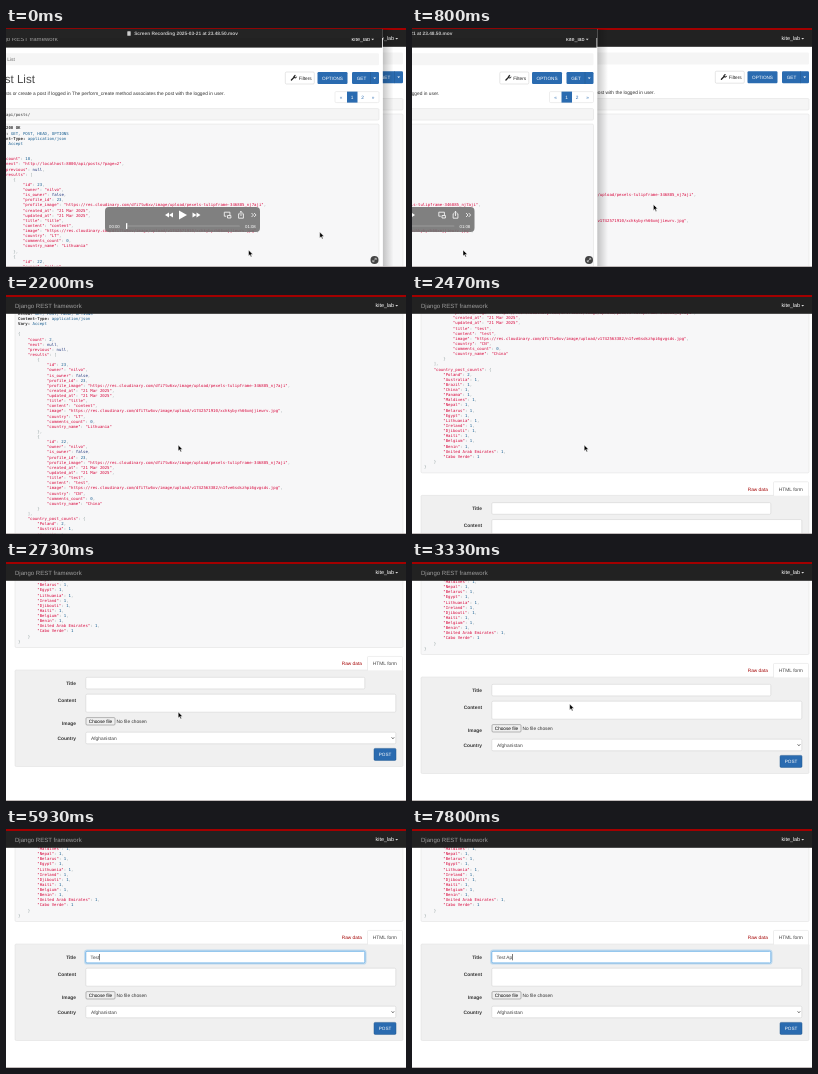
These frames come from a looping animation (400x239 px, 8000 ms). An HTML page:

```html
<!DOCTYPE html>
<html lang="en">
<head>
<meta charset="utf-8">
<title>Post List</title>
<style>
html, body { margin: 0; height: 100%; overflow: hidden; background: #fff; }
svg { display: block; width: 100vw; height: 100vh; }
text { font-family: "Liberation Sans", Arial, sans-serif; white-space: pre; text-rendering: geometricPrecision; }
.code { font-family: "DejaVu Sans Mono", monospace; }
.b { font-weight: bold; }
.mid { text-anchor: middle; }
.end { text-anchor: end; }
.str { fill: #d8063c; }
.num { fill: #195f91; }
.kwd { fill: #1e347b; }
.pun { fill: #93a1a1; }
</style>
</head>
<body>
<svg id="stage" viewBox="0 0 400 239" preserveAspectRatio="none"></svg>
<script>
const BLUE = '#2a6bb0', LINE = 5.13, SIZE = 4.75;
const USER = 'kite_lab', OWNER = 'nilvo';
const CDN = 'https://res.cloudinary.com/dfi7tw6xv/image/upload/';

const text = (x, y, s, size = SIZE, fill = '#333', cls = '') =>
  `<text x="${x}" y="${y}" font-size="${size}" fill="${fill}" class="${cls}">${s}</text>`;
const rect = (x, y, w, h, fill, stroke = 'none', r = 1.2) =>
  `<rect x="${x}" y="${y}" width="${w}" height="${h}" rx="${r}" fill="${fill}" stroke="${stroke}" stroke-width=".5"/>`;
const path = (d, fill, more = '') => `<path d="${d}" fill="${fill}" ${more}/>`;
const group = (id, body) => `<g id="${id}">${body}</g>`;
const caretDown = (x, y, fill) => path(`M${x} ${y}h2.8l-1.4 1.5z`, fill);

// ---- JSON listing: each line is [indent, string] ----
const colour = s => s.replace(/"[^"]*"|null|false|\d+|[^\s\w"]+/g, t => {
  const kind = t[0] === '"' ? 'str' : /\d/.test(t) ? 'num' : /[a-z]/.test(t) ? 'kwd' : 'pun';
  return `<tspan class="${kind}">${t}</tspan>`;
});

const post = (id, word, body, image, code, country, tail) => [
  [2, '{'],
  ...[
    `"id": ${id}`, `"owner": "${OWNER}"`, '"is_owner": false', '"profile_id": 23',
    `"profile_image": "${CDN}pexels-tulipframe-346885_nj7aji"`,
    '"created_at": "21 Mar 2025"', '"updated_at": "21 Mar 2025"',
    `"title": "${word}"`, `"content": "${body}"`, `"image": "${CDN}${image}"`,
    `"country": "${code}"`, '"comments_count": 0', `"country_name": "${country}"`
  ].map((s, i) => [3, s + (i < 12 ? ',' : '')]),
  [2, '}' + tail]
];

const countries = ['Poland', 'Australia', 'Brazil', 'China', 'Panama', 'Maldives', 'Nepal', 'Belarus',
  'Egypt', 'Lithuania', 'Ireland', 'Djibouti', 'Haiti', 'Belgium', 'Benin', 'United Arab Emirates', 'Cabo Verde'];

const listing = (count, next) => [
  [0, '{'], [1, `"count": ${count},`], [1, `"next": ${next},`], [1, '"previous": null,'], [1, '"results": ['],
  ...post(23, 'title', 'content', 'v1742571910/xchkybyrh66xmjjiewrv.jpg', 'LT', 'Lithuania', ','),
  ...post(22, 'test', 'test', 'v1742563382/n1fve6sdszhpi6gvgsds.jpg', 'CN', 'China', ''),
  [1, '],'], [1, '"country_post_counts": {'],
  ...countries.map((c, i) => [2, `"${c}": ${i ? 1 : 2}${i < countries.length - 1 ? ',' : ''}`]),
  [1, '}'], [0, '}']
];

const response = (count, next) => {
  const row = (i, x, s) => text(x, 91.4 + i * LINE, s, 4, '#333', 'code');
  const head = [['Allow', 'GET, POST, HEAD, OPTIONS'], ['Content-Type', 'application/json'], ['Vary', 'Accept']];
  return rect(9, 86, 388, 318, '#f7f7f8', '#ddd') +
    row(0, 12, '<tspan class="b">HTTP 200 OK</tspan>') +
    head.map(([k, v], i) =>
      row(i + 1, 12, `<tspan class="b">${k}:</tspan> <tspan class="num">${v}</tspan>`)).join('') +
    listing(count, next).map(([n, s], i) => row(i + 5, 12 + n * 9.63, colour(s))).join('');
};

// ---- page parts ----
const navbar = rect(0, 0, 400, 18.8, '#222', 'none', 0) + rect(0, 0, 400, 2, '#a30000', 'none', 0) +
  text(9, 12.7, 'Django REST framework', 6.06, '#9d9d9d') +
  text(369.5, 12.4, USER, 5.4, '#fff') + caretDown(389.3, 10, '#ddd');

const intro = rect(9, 24.5, 388, 12, '#f5f5f5') + text(14, 32.2, 'Post List', 4.9, '#666') +
  text(8.5, 54, 'Post List', 11.6, '#4a4a4a') +
  rect(303.3, 43.2, 29, 12, '#fff', '#ccc') + text(316.7, 50.8, 'Filters', SIZE, '#222') +
  path('M309.4 51.2l3.2-3.2', 'none', 'stroke="#222" stroke-width="1.3" stroke-linecap="round"') +
  path('M313.6 46.6a1.3 1.3 0 1 0 .9 1.3', 'none', 'stroke="#222" stroke-width="1"') +
  rect(335.5, 43.2, 30, 12, BLUE) + text(350.5, 50.8, 'OPTIONS', 4.67, '#fff', 'mid') +
  rect(370, 43.2, 27, 12, BLUE) + text(374.7, 50.8, 'GET', 4.67, '#fff') +
  path('M388.5 43.2v12', 'none', 'stroke="#22588f" stroke-width=".5"') + caretDown(391.3, 48.6, '#fff') +
  text(9, 66.2, 'List posts or create a post if logged in The perform_create method associates the post with the logged in user.', 4.82);

const pager = rect(353, 62.8, 44, 11, '#fff', '#ddd') + rect(365, 62.8, 10.5, 11, BLUE, 'none', 0) +
  [['«', 359, BLUE], ['1', 370.2, '#fff'], ['2', 380.5, BLUE], ['»', 391, BLUE]]
    .map(([s, x, c]) => text(x, 70, s, SIZE, c, 'mid')).join('');

const page = (url, count, next, paged) => intro + (paged ? pager : '') +
  `<g transform="translate(0 ${paged ? 9.3 : 0})">` +
  rect(9, 70.5, 388, 11.5, '#f5f5f5', '#ddd') +
  text(12, 77.7, `<tspan class="b">GET</tspan> ${url}`, 4, '#333', 'code') +
  response(count, next) + '</g>';

const label = (y, s) => text(70, y, s, 4.85, '#333', 'b end');
const form = '<g transform="translate(0 311.5)">' +
  rect(9, 115, 388, 96.5, '#f0f0f0', '#ddd') +
  path('M361.5 115.4v-13q0-1 1-1h33q1 0 1 1v13', '#fff', 'stroke="#ddd" stroke-width=".5"') +
  text(335.8, 110.3, 'Raw data', SIZE, '#a30000') + text(366.8, 110.3, 'HTML form', 4.85, '#444') +
  label(129.9, 'Title') + label(146.8, 'Content') + label(170, 'Image') + label(184.7, 'Country') +
  rect(79.8, 122.3, 279, 11.6, '#fff', '#ccc') +
  rect(79.8, 139.2, 310, 18, '#fff', '#ccc') +
  rect(80, 162.6, 29, 7.4, '#efefef', '#767676', 1) + text(94.5, 168, 'Choose file', 4.7, '#000', 'mid') +
  text(110.6, 168, 'No file chosen', 4.75) +
  rect(79.8, 177.2, 310, 11.6, '#fff', '#ccc') + text(85, 184.8, 'Afghanistan', 4.85, '#444') +
  path('M385.6 182.3l1.3 1.5 1.3-1.5', 'none', 'stroke="#333" stroke-width=".7"') +
  rect(368, 193.4, 22, 12, BLUE, '#22588f') + text(379, 201.1, 'POST', 4.67, '#fff', 'mid') + '</g>';

const field = group('focus',
    '<rect x="79.3" y="121.8" width="280" height="12.6" rx="2" fill="none" stroke="#66afe9" stroke-opacity=".35" stroke-width="2.4"/>' +
    '<rect x="79.8" y="122.3" width="279" height="11.6" rx="1.2" fill="#fff" stroke="#66afe9" stroke-width=".8"/>') +
  '<text id="typed" x="84.5" y="129.9" font-size="4.75" fill="#444"></text>' +
  group('caret', rect(0, 125, .6, 6.3, '#222', 'none', 0));

const arrow = path('M0 0v6l1.4-1.2 1 2.2 1-.5-1-2.1 1.9-.1z', '#000', 'stroke="#fff" stroke-width=".5"');
const ibeam = path('M-1.2-3.6Q0-3.6 0-3v6q0 .6-1.2.6M1.2-3.6Q0-3.6 0-3M0 3q0 .6 1.2.6', 'none', 'stroke="#222" stroke-width=".7"');

// ---- player window lying over the page ----
const icon = (x, d, more = '') => `<g transform="translate(${x} 187)">${path(d, '#fff', more)}</g>`;
const thin = 'fill-opacity="0" stroke="#fff" stroke-width=".8"';
const player = rect(123, 179, 155, 25, 'rgba(112,112,112,.88)', 'none', 4) +
  icon(187, 'M0-2.6v5.2L-4 0zM4-2.6v5.2L0 0z') +
  icon(198, 'M-1-4.5v9L7 0z') +
  icon(214.5, 'M-4-2.6v5.2L0 0zM0-2.6v5.2L4 0z') +
  icon(245.5, 'M-3.2-2.8h5.6v3M-3.2-2.8v4h2M0 .5h3.4v2.5H0z', thin) +
  icon(259, 'M-1.2-1.2h-1.2v4.4h4.8v-4.4H1.2M0 1v-4.6M-1.3-2.4L0-3.7l1.3 1.3', thin) +
  icon(271.5, 'M-2-2L0 0l-2 2M.6-2l2 2-2 2', thin) +
  text(127, 199.6, '00:00', 4.3, '#fff') + text(263, 199.6, '01:08', 4.3, '#fff') +
  rect(145, 197.4, 113, 1.2, '#999') + rect(144, 195, 1.3, 6, '#fff', 'none', .6);

const film = '<defs><linearGradient id="shade"><stop stop-opacity=".22"/><stop offset="1" stop-opacity="0"/></linearGradient></defs>' +
  rect(400.5, 1, 11, 238, 'url(#shade)', 'none', 0) +
  rect(0, 1, 400.8, 238, '#fff', 'none', 0) + '<g transform="translate(0 .8)">' +
  page('/api/posts/', 18, '"http://localhost:8000/api/posts/?page=2"', true) + navbar + '</g>' +
  rect(0, 1, 400.8, 9, '#242424', 'none', 0) +
  rect(145.3, 3.3, 3.4, 4.4, '#ccc', 'none', .5) +
  text(204, 7.3, 'Screen Recording 2025-03-21 at 23.48.50.mov', 4.8, '#c4c4c4', 'b mid') +
  '<circle cx="392.5" cy="232" r="4" fill="#444"/>' +
  path('M390.8 233.7l3.4-3.4M390.8 232v1.7h1.7M392.5 230.3h1.7v1.7', 'none', 'stroke="#ddd" stroke-width=".6"') +
  `<g transform="translate(266.5 222)">${arrow}</g>` + player;

document.getElementById('stage').innerHTML = rect(0, 0, 400, 239, '#fff', 'none', 0) +
  group('page', page('/api/posts/?owner__profile=23', 2, 'null', false) + form) + field + navbar +
  group('film', film) + rect(0, 238.2, 400, .8, '#b5adad', 'none', 0) +
  group('arrow', arrow) + group('ibeam', ibeam);

// ---- motion ----
const $ = id => document.getElementById(id);
const [pageEl, filmEl, arrowEl, ibeamEl, focusEl, typedEl, caretEl] =
  ['page', 'film', 'arrow', 'ibeam', 'focus', 'typed', 'caret'].map($);
const move = (el, x, y) => el.setAttribute('transform', `translate(${x} ${y})`);
const show = (el, on) => el.setAttribute('opacity', +on);
const clamp = v => Math.max(0, Math.min(1, v));
const ease = v => (v = clamp(v), v * v * (3 - 2 * v));

// linear track through [time, value] points
const along = (pts, t) => {
  let v = pts[0][1];
  for (let i = 1; i < pts.length; i++) {
    const [a, from] = pts[i - 1], [b, to] = pts[i];
    if (t >= a) v = from + (to - from) * clamp((t - a) / (b - a));
  }
  return v;
};
const scroll = [[1700, 0], [1950, 24], [2200, 76], [2430, 205], [2620, 303], [2730, 318.5], [2860, 318.5], [3000, 314], [3200, 311.5]];
const curX = [[70, 313.7], [1500, 172.2], [2800, 172.2], [3330, 157.8], [3530, 125]];
const curY = [[70, 204], [1500, 150], [2800, 150], [3330, 142], [3530, 128.5]];
const typing = [[5130, 'T'], [5400, 'Te'], [5800, 'Tes'], [5930, 'Test'], [7270, 'Test '], [7470, 'Test A'], [7800, 'Test Ap']];

function draw(t) {
  move(pageEl, 0, -along(scroll, t));
  move(filmEl, -24 - 390 * ease((t - 60) / 1500), 0);
  show(filmEl, t < 1600);

  const x = along(curX, t), y = along(curY, t);
  move(arrowEl, x, y);
  move(ibeamEl, x, y);
  show(arrowEl, t < 3480);
  show(ibeamEl, t >= 3480 && t < 5130);

  show(focusEl, clamp((t - 3530) / 170));
  const last = typing.filter(k => t >= k[0]).pop() || [3660, ''];
  if (typedEl.textContent !== last[1]) typedEl.textContent = last[1];
  const width = last[1] ? typedEl.getComputedTextLength() : 0;
  move(caretEl, 84.5 + width, 0);
  show(caretEl, t >= 3660 && Math.floor((t - last[0]) / 535) % 2 === 0);
}

const start = performance.now();
(function tick() {
  draw((performance.now() - start) % 8000);
  requestAnimationFrame(tick);
})();
</script>
</body>
</html>
```
